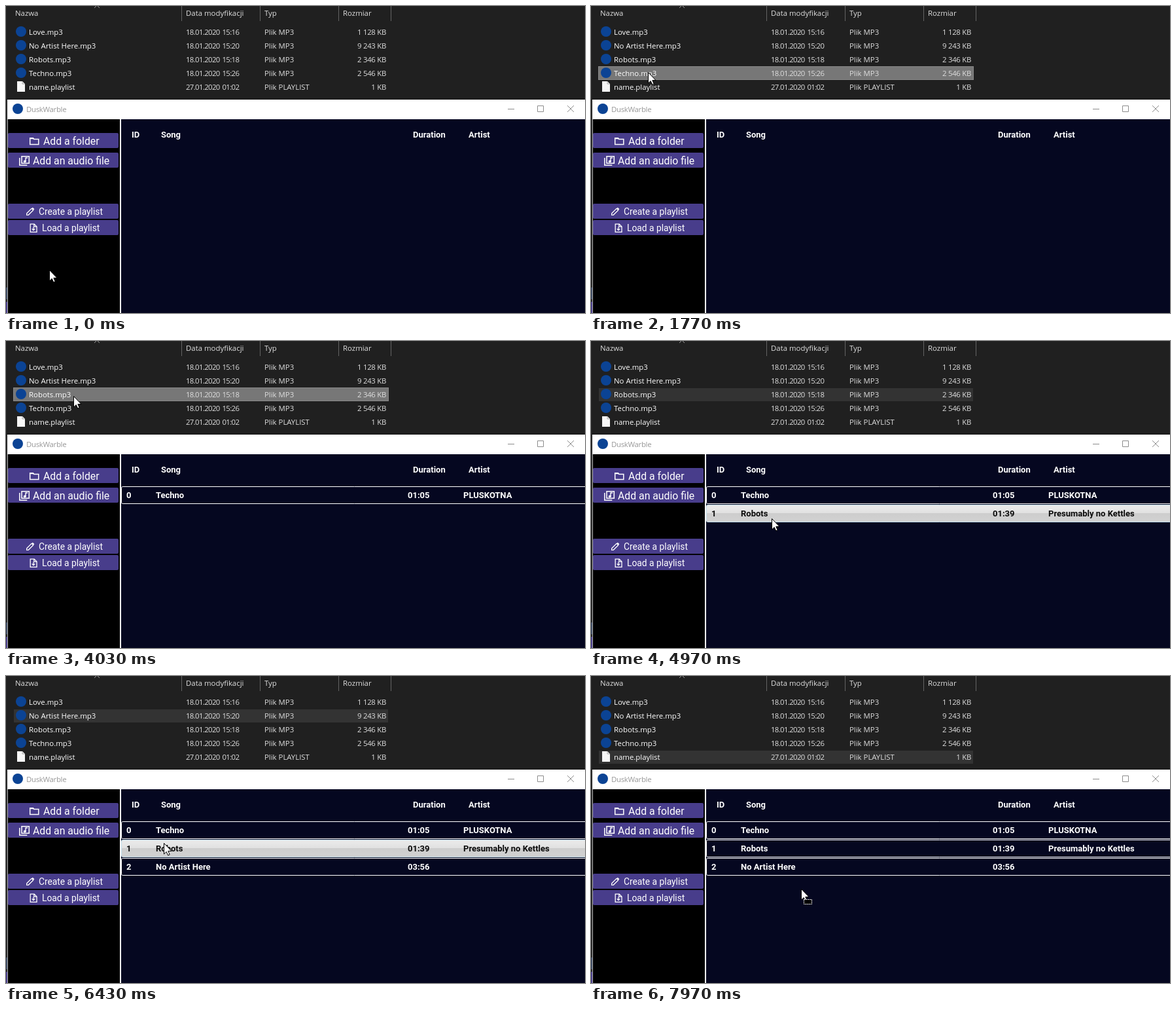
Write an HTML page with a canvas that moves like this. It is 885 px wide and 469 px high and loops after 8 s.

```html
<!DOCTYPE html>
<html lang="en">
<head>
<meta charset="utf-8">
<title>Drag files to a playlist</title>
<style>
html, body { margin: 0; width: 100%; height: 100%; overflow: hidden; background: #202020; }
canvas { display: block; width: 100vw; height: 100vh; }
</style>
</head>
<body>
<canvas id="stage" width="885" height="469"></canvas>
<script>
const ctx = document.getElementById('stage').getContext('2d');
const LOOP = 8000;
const UI = '11.4px "Open Sans", "Noto Sans", sans-serif';
const BOLD = 'bold 13px Roboto, sans-serif';
const LOGO = '#0b4394';

const files = [
  ['Love.mp3', '18.01.2020 15:16', 'Plik MP3', '1 128 KB'],
  ['No Artist Here.mp3', '18.01.2020 15:20', 'Plik MP3', '9 243 KB'],
  ['Robots.mp3', '18.01.2020 15:18', 'Plik MP3', '2 346 KB'],
  ['Techno.mp3', '18.01.2020 15:26', 'Plik MP3', '2 546 KB'],
  ['name.playlist', '27.01.2020 01:02', 'Plik PLAYLIST', '1 KB']
];

const songs = [
  ['0', 'Techno', '01:05', 'PLUSKOTNA'],
  ['1', 'Robots', '01:39', 'Presumably no Kettles'],
  ['2', 'No Artist Here', '03:56', '']
];

// One entry per drag: pressed file, then press, lift and drop times
const drags = [
  { file: 3, press: 1770, lift: 1870, drop: 2900 },
  { file: 2, press: 4000, lift: 4060, drop: 4780 },
  { file: 1, press: 5730, lift: 5770, drop: 6230 },
  { file: 4, press: 7400, lift: 7460, drop: LOOP }
];

// Pointer path: time, x, y
const path = [
  [0, 67, 403], [30, 67, 403], [110, 74, 407], [420, 170, 370],
  [830, 242, 257], [870, 242, 257], [1200, 165, 160], [1600, 88, 101],
  [1870, 88, 101], [2250, 185, 165], [2570, 287, 252], [2730, 301, 277],
  [3100, 301, 277], [3170, 299, 274], [3420, 215, 200], [3700, 128, 120],
  [3950, 104, 84], [4060, 104, 84], [4300, 165, 140], [4530, 265, 254],
  [4700, 290, 305], [4800, 290, 305], [4970, 277, 271], [5370, 130, 79],
  [5570, 112, 59], [5740, 112, 59], [5830, 140, 92], [6130, 258, 318],
  [6230, 258, 318], [6430, 242, 255], [6570, 208, 180], [6850, 130, 108],
  [7130, 95, 122], [7460, 95, 122], [7970, 322, 325], [LOOP, 322, 325]
];

function slope(i, axis) {
  const a = path[i - 1], b = path[i], c = path[i + 1];
  if (!a || !c) return 0;
  const before = (b[axis] - a[axis]) / (b[0] - a[0]);
  const after = (c[axis] - b[axis]) / (c[0] - b[0]);
  return before * after <= 0 ? 0 : 2 * before * after / (before + after);
}

function pointer(t) {
  let i = 0;
  while (i < path.length - 2 && t >= path[i + 1][0]) i++;
  const a = path[i], b = path[i + 1], span = b[0] - a[0];
  const u = (t - a[0]) / span, v = 1 - u;
  const at = k => a[k] * (1 + 2 * u) * v * v + b[k] * u * u * (3 - 2 * u)
    + span * u * v * (slope(i, k) * v - slope(i + 1, k) * u);
  return { x: Math.round(at(1)), y: Math.round(at(2)) };
}

function rect(x, y, w, h, color) {
  ctx.fillStyle = color;
  ctx.fillRect(x, y, w, h);
}

function round(x, y, w, h, r) {
  ctx.beginPath();
  ctx.roundRect(x, y, w, h, r);
}

function dot(x, y, r, color) {
  ctx.fillStyle = color;
  ctx.beginPath();
  ctx.arc(x, y, r, 0, Math.PI * 2);
  ctx.fill();
}

function text(str, x, y, font, color, spacing = 0, align = 'left') {
  ctx.font = font;
  ctx.fillStyle = color;
  ctx.textAlign = align;
  ctx.letterSpacing = spacing + 'px';
  ctx.fillText(str, x, y);
}

function stroke(d, color = '#fff', width = 1.5) {
  ctx.strokeStyle = color;
  ctx.lineWidth = width;
  ctx.stroke(new Path2D(d));
}

function fill(d, color = '#fff') {
  ctx.fillStyle = color;
  ctx.fill(new Path2D(d));
}

function fileAt(p) {
  const i = Math.floor((p.y - 29) / 21);
  return p.x >= 12 && p.x < 585 && i >= 0 && i < files.length ? i : -1;
}

function drawExplorer(selected, hover) {
  rect(0, 0, 885, 142, '#202020');
  for (const x of [268, 388, 508, 588]) rect(x, 0, 1, 23, '#636363');
  stroke('M135 3 L139 -1 L143 3', '#9a9a9a', 1);
  const heads = { Nazwa: 14, 'Data modyfikacji': 275, Typ: 395, Rozmiar: 515 };
  for (const name in heads) text(name, heads[name], 15, UI, '#dedede');

  files.forEach(([name, date, type, size], i) => {
    const y = 29 + i * 21;
    if (i === selected && i === hover) {
      rect(11, y, 574, 21, '#888');
      rect(12, y + 1, 572, 19, '#777');
    } else if (i === selected) rect(12, y + 1, 572, 20, '#333');
    else if (i === hover) rect(11, y, 574, 21, '#4d4d4d');

    if (i < 4) dot(23, y + 10, 8, LOGO);
    else {
      fill(`M17 ${y + 2} h8 l4 4 v12 h-12 z`, '#f7f7f7');
      stroke(`M25 ${y + 2} v4 h4`, '#a8a8a8', 1);
    }
    text(name, 35, y + 15, UI, '#fff');
    ctx.wordSpacing = '1.5px';
    text(date, 275, y + 15, UI, '#dedede', -0.65);
    ctx.wordSpacing = '0px';
    text(type, 395, y + 15, UI, '#dedede');
    text(size, 581, y + 15, UI, '#dedede', -0.3, 'right');
  });
}

function drawButton(label, x, y, size) {
  ctx.fillStyle = '#483d8b';
  round(3, y, 169, 23, 2);
  ctx.fill();
  text(label, x, y + (size > 14 ? 18 : 17), `${size}px Roboto, sans-serif`, '#fff');
}

function drawSidebar() {
  rect(0, 173, 174, 296, '#000');
  rect(0, 142, 2, 327, '#252525');
  rect(0, 430, 2, 18, '#3c4a62');
  rect(0, 452, 2, 17, '#483d8b');
  rect(2, 173, 1, 296, '#b4b4b4');
  rect(174, 173, 2, 296, '#fff');

  drawButton('Add a folder', 57, 194, 15.8);
  drawButton('Add an audio file', 41, 224, 15.8);
  drawButton('Create a playlist', 50, 302, 13.8);
  drawButton('Load a playlist', 55, 327, 13.8);

  // Folder
  stroke('M36.7 201.7 h4.5 l1.6 1.8 h7 v8 h-13.1 z');
  fill('M36 201 h5.5 l2 2.3 h-7.5 z');
  // Stacked music sheets
  stroke('M24 229.7 h11.3 v10.6 h-11.3 z M20.8 232 v11.3 h11.5');
  stroke('M30 238 v-6 h3', '#fff', 1.4);
  dot(28.7, 237.4, 1.9, '#fff');
  // Pencil
  stroke('M31.7 319.3 v-2.5 l7.4 -7.4 l2.5 2.5 l-7.4 7.4 z', '#fff', 1.3);
  fill('M39.3 309.2 l1.5 -1.5 l2.6 2.6 l-1.5 1.5 z');
  // Page with arrow
  stroke('M37.2 333.2 h6 l3.8 3.8 v8.3 h-9.8 z M42.8 333.5 v3.7 h4', '#fff', 1.3);
  stroke('M42 337.5 v5 M39.7 340.4 l2.3 2.3 l2.3 -2.3', '#fff', 1.3);
}

function drawTitleBar() {
  rect(0, 141, 885, 2, '#1c1c1c');
  rect(2, 143, 883, 30, '#fff');
  dot(18, 157, 8, LOGO);
  text('DuskWarble', 31, 162, UI, '#999', -0.3);
  stroke('M767 157.5 h10 M812.5 152.5 h9 v9 h-9 z M858 152 l10 10 M868 152 l-10 10', '#8c8c8c', 1);
}

function drawSongs(count, p, dragging) {
  rect(176, 173, 709, 296, '#050720');
  const heads = { ID: 192, Song: 237, Duration: 622, Artist: 707 };
  for (const name in heads) text(name, heads[name], 201, BOLD, '#fff');

  songs.slice(0, count).forEach((song, i) => {
    const y = 222 + i * 28;
    const over = !dragging && p.x >= 176 && p.y >= y && p.y < y + 28;
    round(176.5, y + 0.5, 720, 26, 2);
    if (over) {
      const g = ctx.createLinearGradient(0, y, 0, y + 27);
      g.addColorStop(0, '#ececec');
      g.addColorStop(0.5, '#e0e0e0');
      g.addColorStop(0.5, '#cdcdcd');
      g.addColorStop(1, '#d2d2d2');
      ctx.fillStyle = g;
      ctx.fill();
    }
    ctx.strokeStyle = over ? '#c3dfec' : '#fff';
    ctx.lineWidth = 1;
    ctx.stroke();
    [184, 229, 614, 699].forEach((x, k) =>
      text(song[k], x, y + 18, BOLD, over ? '#0a0a0a' : '#fff'));
  });
}

// Translucent thumbnail; screen blending keeps the text below it bright
function drawGhost(p) {
  const x = p.x - 51, y = p.y - 86;
  ctx.save();
  ctx.globalCompositeOperation = 'screen';
  const g = ctx.createLinearGradient(0, y, 0, y + 104);
  g.addColorStop(0, '#465860');
  g.addColorStop(1, '#466068');
  ctx.fillStyle = g;
  round(x, y, 104, 104, 3);
  ctx.fill();
  round(x + 0.5, y + 0.5, 103, 103, 3);
  ctx.strokeStyle = '#203034';
  ctx.lineWidth = 1;
  ctx.stroke();
  ctx.restore();
}

function drawPointer(p, withBox) {
  ctx.save();
  ctx.translate(p.x - 1, p.y);
  const arrow = 'M.5 .5 V17 L4.2 13.5 L6.7 19 L9.2 17.9 L6.8 12.5 H12 Z';
  fill(arrow);
  stroke(arrow, '#000', 1);
  if (withBox) {
    rect(4, 16, 13, 8, '#000');
    ctx.setLineDash([2, 1]);
    stroke('M4.5 16.5 h12 v7 h-12 z', '#fff', 1);
  }
  ctx.restore();
}

function draw(t) {
  const p = pointer(t);
  const last = drags.filter(d => t >= d.press).pop();
  const dragging = !!last && t >= last.lift && t < last.drop;
  const count = drags.filter(d => t >= d.drop).length;
  const inPlayer = p.y >= 142;

  drawExplorer(last ? last.file : -1, dragging ? -1 : fileAt(p));
  drawSidebar();
  drawTitleBar();
  drawSongs(count, p, dragging);
  if (dragging && !inPlayer) drawGhost(pointer(t - 40));
  drawPointer(p, dragging && inPlayer);
}

const start = performance.now();
function tick() {
  draw((performance.now() - start) % LOOP);
  requestAnimationFrame(tick);
}
tick();
</script>
</body>
</html>
```
